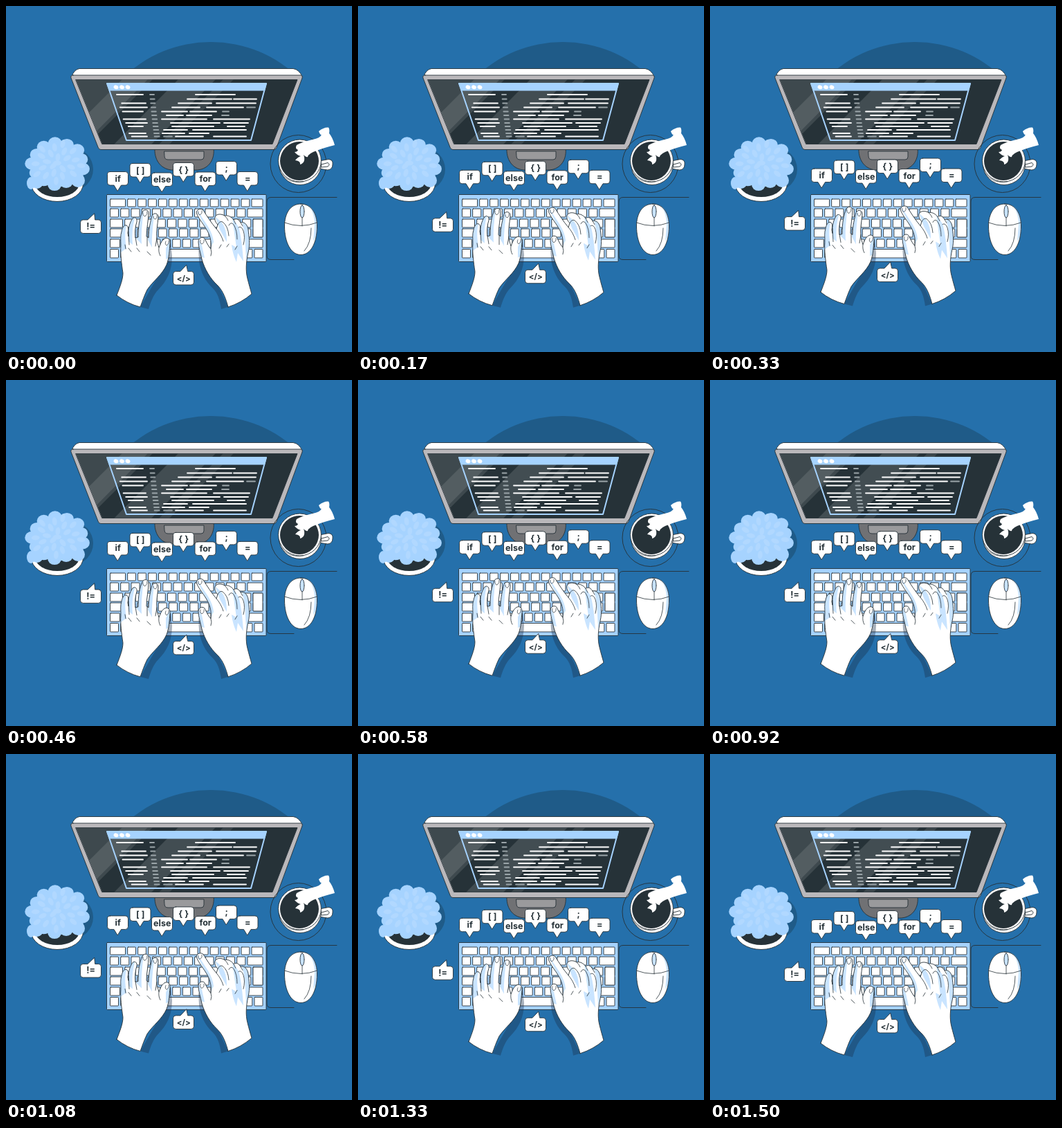
Recreate the animation shown at these times as an HTML page with a canvas. Size 500 px wide and 500 px high, loop 1540 ms.

```html
<!DOCTYPE html>
<html lang="en">
<head>
<meta charset="utf-8">
<title>Typing code</title>
<style>
html, body { margin: 0; width: 100%; height: 100%; overflow: hidden; background: #2570ab; }
canvas { display: block; width: 500px; height: 500px; }
</style>
</head>
<body>
<canvas id="stage" width="500" height="500"></canvas>
<script>
const ctx = document.getElementById('stage').getContext('2d');
const INK = '#263238', WHITE = '#fff', SKY = '#a6d3ff', PALE = '#c9e4ff', SHADOW = 'rgba(25,48,76,.38)';
const LOOP = 1540, STEPS = 37, LIFT = 10;

function shape(path, fill, stroke = INK, width = 0.9) {
  const p = typeof path === 'string' ? new Path2D(path) : path;
  if (fill) { ctx.fillStyle = fill; ctx.fill(p); }
  if (stroke) { ctx.strokeStyle = stroke; ctx.lineWidth = width; ctx.stroke(p); }
}

function oval(x, y, rx, ry, fill, stroke = null, angle = 0) {
  const p = new Path2D();
  p.ellipse(x, y, rx, ry, angle, 0, Math.PI * 2);
  shape(p, fill, stroke);
}

function box(x, y, w, h, r, fill, stroke = INK) {
  const p = new Path2D();
  p.roundRect(x, y, w, h, r);
  shape(p, fill, stroke);
}

function clipped(path, draw) {
  ctx.save();
  ctx.clip(new Path2D(path));
  draw();
  ctx.restore();
}

// Each row: y followed by start/end pairs of the text runs.
const codeRows = [
  [128, 274, 331],
  [134.5, 262, 326, 329, 362],
  [140.5, 249, 297, 304, 361],
  [146.5, 240, 280, 290, 343, 348, 360],
  [152.5, 225, 262, 266, 304, 313, 322],
  [158, 232, 256, 261, 297, 312, 322],
  [163.5, 225, 290, 300, 352],
  [169, 238, 309, 315, 350],
  [174, 240, 300, 320, 345],
  [179, 228, 262, 270, 347],
  [184, 226, 258, 265, 293],
  [188.5, 228, 240, 245, 285, 300, 347]
];

function dash(x1, x2, y, color) {
  shape(`M${x1} ${y}H${x2}`, null, color, 1.8);
}

function monitor() {
  clipped('M0 0H500V95H0Z', () => oval(296, 234, 182, 182, '#1f5b88'));
  shape('M215 205C214 221 222 235 239 237H277C294 235 302 221 300 205Z', '#707174');
  shape('M229 210H286V218Q286 222 282 222H234Q229 222 229 217Z', '#9a9a9c');
  shape('M95 102Q98 92 106 90.5H415Q424 92 428 102Z', WHITE);
  shape('M97 100H425Q429 100 428 104L391 204.5Q390 207.5 387 207.5H137Q134 207.5 133 204L94 104Q93 100 97 100Z', '#bab8bb');
  const screen = 'M101 106.5H421L385 199.5H139Z';
  shape(screen, '#263238');
  clipped(screen, () => {
    shape('M100 106H205L112 200H100Z', 'rgba(255,255,255,.11)', null);
    shape('M168 106H212L118 200H74Z', 'rgba(255,255,255,.11)', null);
    shape('M249 106H303L210 200H156Z', 'rgba(255,255,255,.13)', null);
    shape('M314 106H329L236 200H221Z', 'rgba(255,255,255,.1)', null);
  });
  shape('M146 112H376L354 194H174Z', null, SKY, 2);
  shape('M145 111.5H377L374 122.5H149Z', SKY, null);
  for (const x of [159, 167.5, 176]) oval(x, 117.3, 3.5, 2.8, WHITE, null, 0.4);
  codeRows.forEach(([y, ...runs], row) => {
    const left = 160 + row * 1.6 + (row % 3) * 2;
    if (row % 4 !== 1) dash(left, 198 + (row % 4) * 2, y, WHITE);
    dash(208 + row * 0.6, 214 + row * 0.7, y, '#9ba5a9');
    for (let i = 0; i < runs.length; i += 2) {
      const short = runs[i + 1] - runs[i] < 13;
      dash(runs[i], runs[i + 1], y, short ? '#9ba5a9' : WHITE);
    }
  });
}

function plant() {
  oval(95, 236, 31, 31, '#1f5b88');
  oval(74, 257, 37.5, 25.5, WHITE, INK);
  oval(74, 256, 32, 20, INK);
  const petals = 13;
  for (let i = 0; i < petals; i++) {
    const a = i / petals * Math.PI * 2 - 1.2;
    const reach = 1 + 0.05 * Math.sin(i * 2.3);
    oval(75 + Math.cos(a) * 36 * reach, 228 + Math.sin(a) * 29 * reach, 10, 9, SKY);
  }
  oval(74, 228, 37, 33, SKY);
  oval(36, 256, 6, 9, SKY);
  oval(45, 254, 9, 10, SKY);
  oval(104, 252, 10, 10, SKY);
  for (let i = 0; i < 24; i++) {
    const a = i * 2.4, r = 7.6 * Math.sqrt(i);
    oval(74 + Math.cos(a) * r, 227 + Math.sin(a) * r * 0.78, 6, 3.4, '#b1d8ff', null, a);
  }
}

function coffee() {
  oval(422.5, 228, 40.5, 41.5, null, INK);
  shape('M453 224L466 221.5Q473 222 472 229Q472 236 465 237L452 235Z', WHITE);
  shape('M456 229L465 226.5Q469 229 465 232L456 233Z', WHITE);
  oval(425, 228.5, 30.5, 30, WHITE, INK);
  oval(424.5, 223.5, 31, 30.5, WHITE, INK);
  oval(424, 224, 27.5, 27.5, INK, INK);
  shape('M397 241Q409 258 430 254', null, INK, 0.7);
  shape('M452 181Q459 175 466 175.5Q468 178 467 184Q472 190 475 201Q459 205 449 209Q437 213 436 218Q433 219 430 215Q434 226 425 229Q426 224 418 223Q422 218 426 217Q421 216 417 211Q421 211 422 208Q417 206 420 201Q429 196 443 193Q454 191 456 186Q454 187 452 181Z', WHITE, null);
}

function mouse() {
  shape('M478 276.5H383Q377 276.5 377 283V361Q377 366.5 383 366.5H416', null);
  const body = 'M426 286C442 286 449.5 301 449.5 318C449.5 343 440 359.5 426 359.5C412 359.5 402.5 342 402.5 318C402.5 301 410 286 426 286Z';
  shape(body, WHITE, null);
  clipped(body, () => {
    shape('M434 284C442 292 446 304 446 316L444 340L452 326V284Z', PALE, null);
  });
  shape(body, null);
  shape('M402.5 313Q426 322 449.5 313M428 286V318M441 321Q441 343 431 354', null, INK, 0.8);
  oval(428, 297, 3, 9, PALE, INK);
}

// Each row: top, height, first key width, last key width.
const keyRows = [
  [279, 11, 22, 16], [293, 12, 12, 22], [308, 12, 18, 14],
  [322, 12, 21, 14], [337, 12, 14, 28], [351.5, 12.5, 12, 12]
];

function keyboard() {
  box(145.5, 272.5, 230.5, 97, 1, SKY);
  const key = (x, y, w, h) => box(x, y, w, h, 0.8, WHITE);
  keyRows.forEach(([y, h, first, last], row) => {
    const start = 150.5 + first + 3.2, end = 371 - last - 3.2;
    const count = Math.round((end - start + 3.2) / 15.2);
    const pitch = (end - start + 3.2) / count;
    key(150.5, y, first, h);
    key(371 - last, y, last, h);
    for (let i = 0; i < count; i++) {
      if (row === 5 && i > 2 && i < 9) continue;
      key(start + i * pitch, y, pitch - 3.2, h);
    }
    if (row === 5) key(start + 3 * pitch, y, 6 * pitch - 3.2, h);
  });
  box(357, 308, 14, 26, 0.8, WHITE);
}

const leftHand = 'M160 418C165 405 169 395 169 386C167 372 165 358 166 346C166 338 165 332 167 326C168 320 171 316 174 317C177 318 177 323 176 328L177 333C176 322 179 312 183 307C186 304 190 307 189 312C187 318 186 326 187 335L191 334C191 318 193 306 197 298C199 293 206 294 206 299C206 309 203 322 203 333L206 335C206 322 209 311 211 303C213 298 221 299 220 306C219 316 217 326 218 336C218 342 220 345 221 349C223 345 224 340 228 337C233 333 238 337 237 344C236 352 236 364 232 374C226 388 212 398 204 410C200 418 197 427 194 435Q175 430 160 418Z';
const rightHand = 'M321 435C318 424 314 412 306 404C295 394 287 380 283 366C281 356 278 348 278 341C278 334 286 332 288 338C291 344 293 348 296 351C297 343 296 334 291 325C286 316 279 308 276 301C273 295 281 291 285 295C290 303 297 314 304 322L306 316C303 313 301 309 302 305C304 300 311 300 316 303C321 302 326 305 329 309C333 306 337 309 339 313C344 311 349 316 350 323C351 332 353 344 350 356C347 370 346 382 349 394C351 402 353 409 355 416Q340 429 321 435Z';

function hands() {
  shape('M194 435L206 438C209 428 213 417 220 410C232 398 240 383 240 362L238 342L220 390Z', SHADOW, null);
  shape('M321 435L311 438C309 424 306 415 299 408C288 398 281 384 279 368L278 350L300 390Z', SHADOW, null);

  shape(leftHand, WHITE, null);
  clipped(leftHand, () => {
    shape('M164 314H175C171 326 172 336 174 350L166 356Z', PALE, null);
    shape('M176 308L187 304C182 320 182 332 183 345L177 340Z', PALE, null);
    shape('M189 318L199 293C197 313 195 328 196 344L188 336Z', PALE, null);
    shape('M204 322L214 298C213 316 210 332 211 349L205 338Z', PALE, null);
    shape('M238 336L231 350L231 366L238 362Z', PALE, null);
  });
  shape(leftHand, null);
  shape('M177 326L178 345M187 334L189 346M204 334L204 347M221 349Q220 356 223 361M177 350L181 355M189 350L193 355M204 355L209 360M172 345L173 351M218 335L216 347', null, INK, 0.8);
  shape('M198 299Q197 303 201 304Q205 301 204 297M213 304Q213 308 216 308Q219 306 218 302M231 340Q229 344 232 346Q236 344 235 339', null, INK, 0.7);

  shape(rightHand, WHITE, null);
  clipped(rightHand, () => {
    shape('M274 292L281 302C288 313 299 326 300 341L296 349L288 320Z', PALE, null);
    shape('M302 304L310 311C317 318 319 329 319 341L309 323Z', PALE, null);
    shape('M327 307L336 319C340 332 342 353 343 369L335 357L333 370C328 359 327 352 326 345L333 349Z', PALE, null);
    shape('M341 313H352V358L348 370C345 350 347 331 341 313Z', PALE, null);
    shape('M277 334L283 346L287 364L280 362Z', PALE, null);
  });
  shape(rightHand, null);
  shape('M304 322Q311 330 314 340M306 316Q309 310 313 312Q321 318 322 332M316 303Q320 307 321 310M322 317Q325 311 329 316Q334 324 334 337M329 309L332 315M336 320Q340 317 343 325Q346 334 343 345M339 313L342 318M296 351Q298 356 296 361M311 345L308 350M322 344L319 348M334 347L331 352', null, INK, 0.8);
  shape('M278 297Q277 301 280 302Q284 300 283 296M281 338Q280 343 283 344Q287 342 286 338', null, INK, 0.7);
}

const bubbles = [
  ['if', 146.5, 239.5], ['[ ]', 179, 227.5], ['else', 210.5, 241],
  ['{ }', 241.5, 226.5], ['for', 273, 240], [';', 303.5, 224.5],
  ['=', 334, 239.5], ['!=', 107.5, 309, 20], ['</>', 241.5, 383.5, 19]
];

// A tip position places the tail on top; otherwise it hangs below the box.
function bubble(label, x, y, tip) {
  const tail = tip
    ? 'H26Q30 0 30 4V15.5Q30 19.5 26 19.5H4Q0 19.5 0 15.5V4Q0 0 4 0'
    : 'H26Q30 0 30 4V15.5Q30 19.5 26 19.5H20L14.7 28L9.5 19.5H4Q0 19.5 0 15.5V4Q0 0 4 0Z';
  const outline = tip ? `M21.5 0${tail}H10.5L${tip} -9Z` : `M4 0${tail}`;
  ctx.save();
  ctx.translate(x, y);
  shape(outline, WHITE);
  ctx.fillStyle = INK;
  ctx.font = `700 ${label === '</>' ? 11.5 : 12.5}px Inter, "Open Sans", sans-serif`;
  ctx.textAlign = 'center';
  ctx.fillText(label, 15.2, 14);
  ctx.restore();
}

function draw(time) {
  const step = Math.floor((time % LOOP + 5) / (LOOP / STEPS)) % STEPS;
  const phase = step / (STEPS - 1);
  const rise = LIFT * (1 - Math.abs(1 - 2 * phase));

  ctx.fillStyle = '#2570ab';
  ctx.fillRect(0, 0, 500, 500);
  ctx.lineJoin = ctx.lineCap = 'round';
  monitor();
  plant();
  coffee();
  mouse();
  keyboard();
  ctx.save();
  ctx.translate(0, -rise);
  hands();
  bubbles.forEach(item => bubble(...item));
  ctx.restore();
}

let start;
function tick(now) {
  start ??= now;
  draw(now - start);
  requestAnimationFrame(tick);
}
draw(0);
requestAnimationFrame(tick);
</script>
</body>
</html>
```
